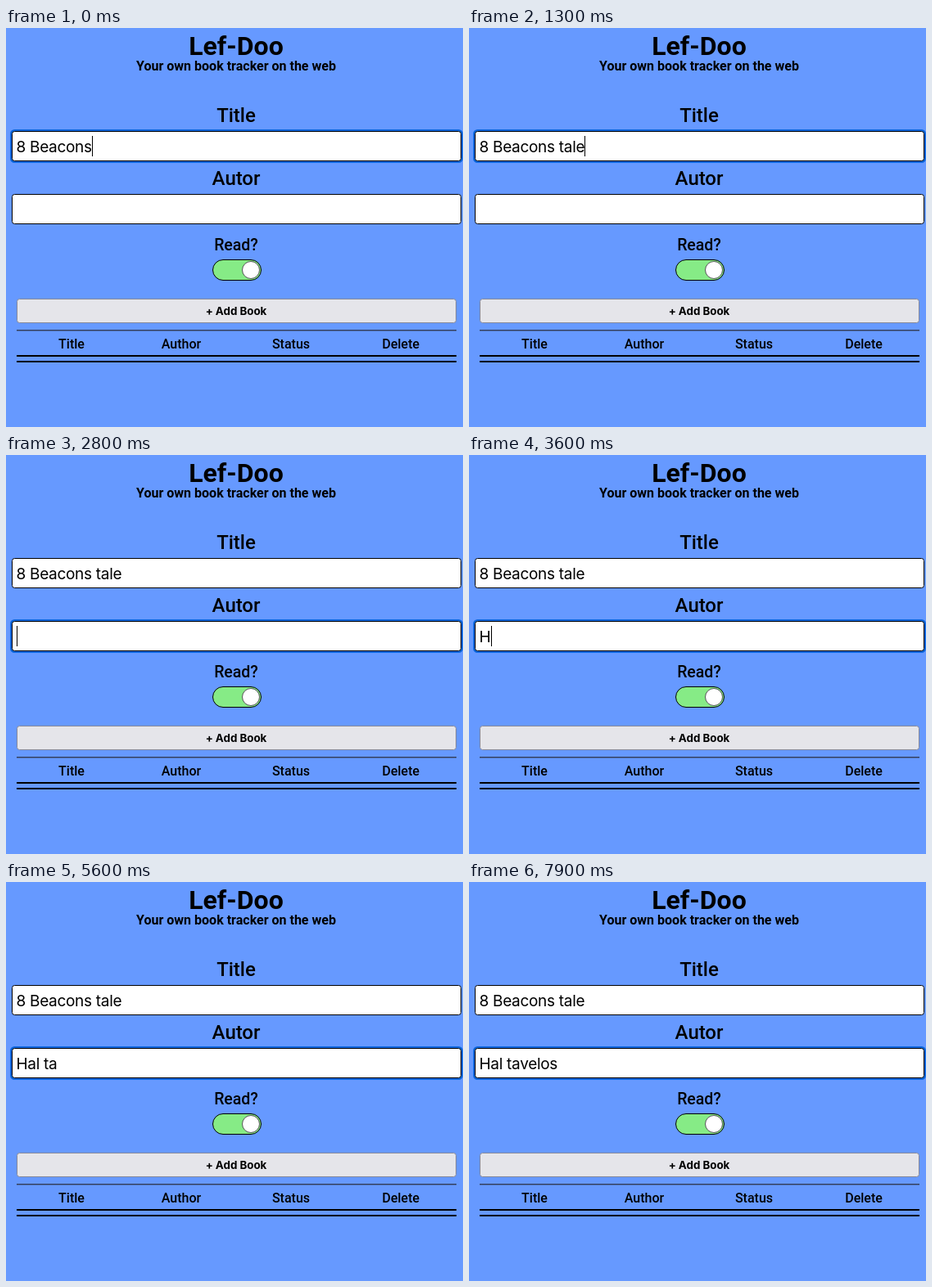
These frames come from a looping animation (558 by 488 pixels, 8 s). An HTML page:

```html
<!DOCTYPE html>
<html lang="en">
<head>
<meta charset="utf-8">
<title>Book tracker</title>
<style>
  html, body { margin: 0; width: 100%; height: 100%; overflow: hidden; background: #69f; }
  svg { display: block; width: 558px; height: 488px; }
  text { font-family: Roboto, sans-serif; font-weight: 500; text-anchor: middle; }
  .bold { font-weight: 700; }
  .label { font-size: 24px; }
  .head { font-size: 16px; }
  .button { font: 700 13.33px Inter, sans-serif; }
  .value { font: 400 19px Inter, sans-serif; letter-spacing: -.3px; text-anchor: start; white-space: pre; }
  .box { fill: #fff; stroke: #000; }
  .ring { fill: none; stroke: #0a65dc; stroke-width: 3; }
</style>
</head>
<body>
<svg viewBox="0 0 558 488">
  <rect width="558" height="488" fill="#69f"/>
  <text class="bold" x="281" y="33" font-size="32">Lef-Doo</text>
  <text class="bold" x="281" y="52" font-size="16">Your own book tracker on the web</text>

  <text class="label" x="281" y="115">Title</text>
  <g class="field" transform="translate(0 126)">
    <rect class="ring" x="6.5" y="-.5" width="550" height="38" rx="4"/>
    <rect class="box" x="7.5" y=".5" width="548" height="36" rx="3"/>
    <text class="value" x="12.5" y="26"></text>
    <rect class="caret" y="6" width="1" height="25"/>
  </g>

  <text class="label" x="281" y="192">Autor</text>
  <g class="field" transform="translate(0 203)">
    <rect class="ring" x="6.5" y="-.5" width="550" height="38" rx="4"/>
    <rect class="box" x="7.5" y=".5" width="548" height="36" rx="3"/>
    <text class="value" x="12.5" y="26"></text>
    <rect class="caret" y="6" width="1" height="25"/>
  </g>

  <text x="281" y="272" font-size="19.5">Read?</text>
  <rect x="252.5" y="283.5" width="59" height="25" rx="12.5" fill="#86eb86" stroke="#000"/>
  <circle cx="299" cy="296" r="10.5" fill="#fff" stroke="#555"/>

  <rect x="13.5" y="331.5" width="536" height="29" rx="3" fill="#e5e5ea" stroke="#858899"/>
  <text class="button" x="281" y="351">+ Add Book</text>

  <rect x="13" y="369" width="537" height="1.5" fill="#35405c"/>
  <text class="head" x="80" y="392">Title</text>
  <text class="head" x="214" y="392">Author</text>
  <text class="head" x="348" y="392">Status</text>
  <text class="head" x="482" y="392">Delete</text>
  <rect x="13" y="400" width="537" height="2"/>
  <rect x="13" y="407" width="537" height="2"/>
</svg>
<script>
const LOOP = 8000, SWITCH = 2800;

// keys: when each further character appears; blinks: intervals with a hidden caret
const fields = [
  { text: "8 Beacons tale", typed: 9, from: 0, to: SWITCH,
    keys: [100, 800, 900, 1100, 1300],
    blinks: [[700, 800], [1800, 2400], [2500, SWITCH]] },
  { text: "Hal tavelos", typed: 0, from: SWITCH, to: LOOP,
    keys: [3500, 3800, 4100, 4600, 5200, 5300, 5700, 5800, 6300, 6500, 6600],
    blinks: [[3400, 3500], [4500, 4600], [5100, 5200], [5600, 5700],
             [6200, 6300], [6800, 7400], [7700, LOOP]] }
];

document.querySelectorAll(".field").forEach((group, i) => {
  for (const part of ["ring", "value", "caret"]) fields[i][part] = group.querySelector("." + part);
});

const within = (time, [start, end]) => time >= start && time < end;
const show = (element, visible) => element.setAttribute("visibility", visible ? "visible" : "hidden");

function drawField(field, time) {
  const count = field.typed + field.keys.filter(key => key <= time).length;
  const content = field.text.slice(0, count);
  if (field.value.textContent !== content) field.value.textContent = content;

  const focused = within(time, [field.from, field.to]);
  show(field.ring, focused);
  show(field.caret, focused && !field.blinks.some(blink => within(time, blink)));
  const width = count ? field.value.getComputedTextLength() : 0;
  field.caret.setAttribute("x", Math.round(12.7 + width));
}

function draw() {
  const time = performance.now() % LOOP;
  fields.forEach(field => drawField(field, time));
  requestAnimationFrame(draw);
}
draw();
</script>
</body>
</html>
```
